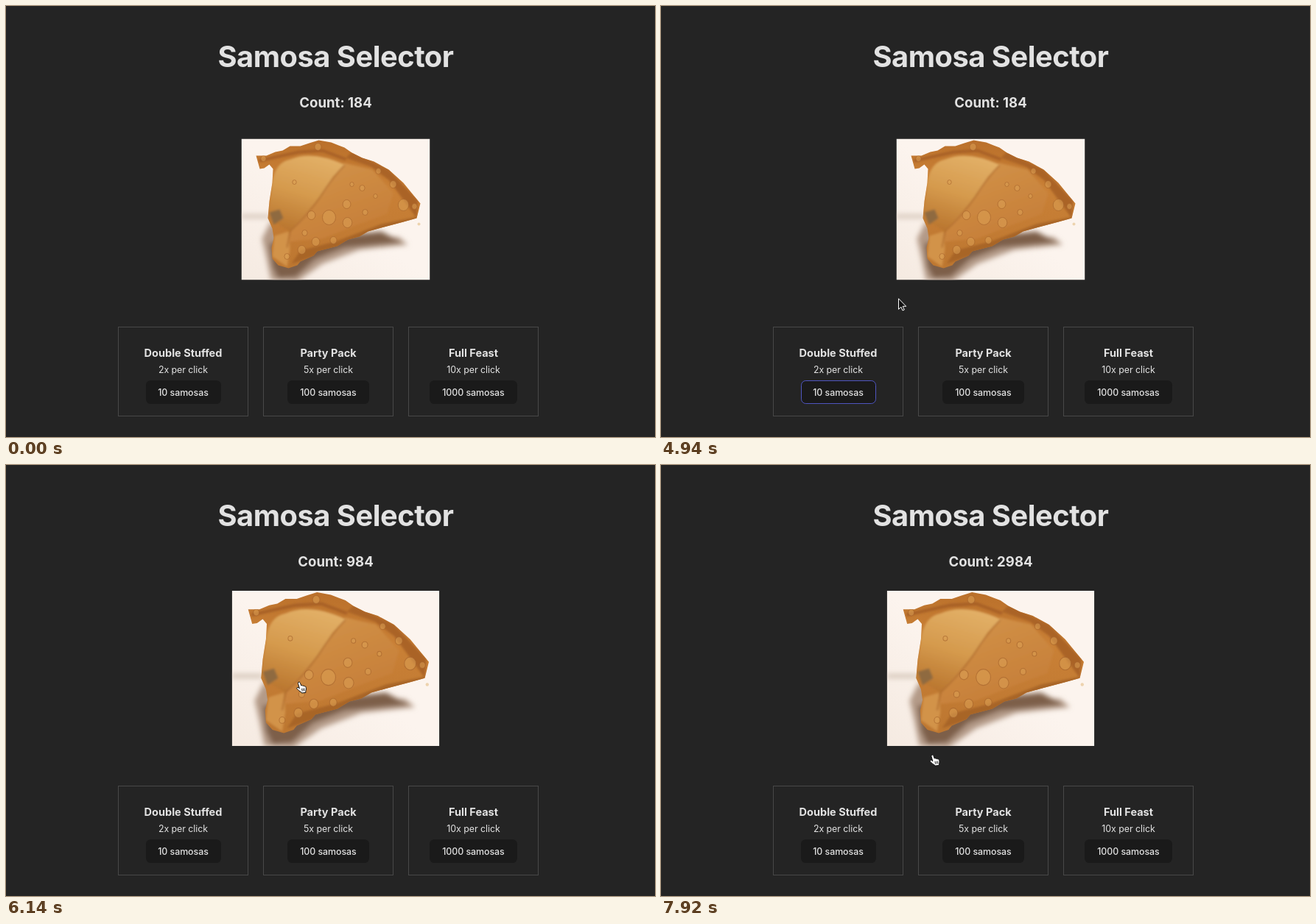
An HTML page for the animation above (8000 ms loop, 881 px wide and 586 px high).

```html
<!DOCTYPE html>
<html lang="en">
<head>
<meta charset="utf-8">
<title>Samosa Selector</title>
<style>
  html, body { margin: 0; width: 100%; height: 100%; overflow: hidden; background: #242424; }
  svg { display: block; width: 100%; height: 100%; }
  text {
    font-family: Inter, "Open Sans", sans-serif;
    font-optical-sizing: none;
    font-size: 12.4px;
    letter-spacing: -.004em;
    text-anchor: middle;
    fill: #e2e2e2;
  }
  .title { font-size: 39.8px; font-weight: 700; letter-spacing: -.012em; }
  .count { font-size: 18.6px; font-weight: 700; letter-spacing: 0; }
  .name { font-size: 14.5px; font-weight: 700; letter-spacing: 0; }
  .price { font-weight: 500; }
  .card { fill: none; stroke: #484848; }
  .button { fill: #1a1a1a; }
  .ring { fill: none; stroke: #646cff; }
</style>
</head>
<body>
<svg viewBox="0 0 881 586">
  <defs>
    <linearGradient id="plate" x1="1" y1="0" x2="0" y2="1">
      <stop offset=".5" stop-color="#fcf4ee"/>
      <stop offset="1" stop-color="#f5eae1"/>
    </linearGradient>
    <linearGradient id="crust" x1=".6" y1="0" x2=".5" y2="1">
      <stop offset="0" stop-color="#b96f2a"/>
      <stop offset=".35" stop-color="#c98036"/>
      <stop offset="1" stop-color="#bd7731"/>
    </linearGradient>
    <linearGradient id="face" x1=".6" y1="0" x2=".3" y2="1">
      <stop offset="0" stop-color="#e2af66"/>
      <stop offset=".5" stop-color="#d59a4d"/>
      <stop offset="1" stop-color="#b9752e"/>
    </linearGradient>
    <linearGradient id="side" x2=".5" y2="1">
      <stop offset="0" stop-color="#d3944a"/>
      <stop offset="1" stop-color="#c67e38"/>
    </linearGradient>
    <filter id="soft" x="-30%" y="-50%" width="160%" height="200%"><feGaussianBlur stdDeviation="3.5"/></filter>
    <filter id="blend" x="-20%" y="-20%" width="140%" height="140%"><feGaussianBlur stdDeviation="1.4"/></filter>
    <clipPath id="frame"><path d="M0 0H256V192H0Z"/></clipPath>
    <clipPath id="inside"><use href="#body"/></clipPath>
  </defs>

  <text class="title" x="447.5" y="82.5">Samosa Selector</text>
  <text class="count" id="count" x="447.5" y="138"></text>

  <g id="photo">
    <g clip-path="url(#frame)">
      <path fill="url(#plate)" d="M0 0H256V192H0Z"/>
      <g filter="url(#soft)">
        <path fill="#b39a87" d="M40 112 28 136 34 162 40 192 76 194 110 170 160 151 226 144 214 134 150 130 80 150Z"/>
        <path fill="#7d5f4a" d="M38 142 42 174 50 190 74 188 100 164 140 148 218 141 190 126 150 130Z"/>
        <path fill="#d3c4b7" d="M0 103H38V108H0Z"/>
      </g>
      <path id="body" fill="url(#crust)" d="M20 23 25 41 31 40 38 35 43 41 42 60 38 85 36 108 42 122 44 135 41 148 42 163 50 172 64 176 76 172 80 167 98 159 103 153 130 146 145 137 160 133 172 126 190 121 220 113 238 108 243 88 233 76 220 60 200 42 180 31 164 26 150 19 140 12 132 9 122 5 105 2 92 6 80 10 66 10 56 16 46 18 34 23Z"/>
      <g clip-path="url(#inside)">
        <g filter="url(#blend)">
          <path fill="url(#side)" d="M140 33 178 42 206 74 198 102 160 116 110 136 64 140 70 118Z"/>
          <path fill="#d2934a" d="M45 132 64 126 66 150 62 174 42 160Z"/>
          <path fill="url(#face)" d="M42 60Q46 32 66 28 96 15 140 35L124 52 106 80 66 126 36 108Z"/>
          <path fill="#aa6325" d="M142 26 176 38 200 56 222 86 238 108 240 84 200 42 150 18Z"/>
          <path fill="#a86526" d="M68 170 80 152 130 139 190 116 240 106 232 114 140 146Z"/>
          <path fill="#8f6a40" d="M38 100 52 96 57 108 44 117Z"/>
          <path fill="none" stroke="#b06d2f" stroke-width="1.6" d="M140 36Q124 52 107 79 90 104 66 126L62 148"/>
          <path fill="none" stroke="#a86125" stroke-width="4" d="M24 30 46 25 78 18 110 16 142 28"/>
        </g>
        <g id="bubbles" fill="#dca055" fill-opacity=".55" stroke="#a3622a" stroke-opacity=".6"></g>
      </g>
      <circle cx="241" cy="116" r="2" fill="#edd3ae"/>
    </g>
  </g>

  <g id="cards"></g>

  <path id="arrow" fill="#111" stroke="#fff" d="M.5 .8V15.4L3.9 12.2 6 17 8.3 16 6.2 11.3H10.7Z"/>
  <g id="hand" stroke="#111" stroke-linejoin="round" stroke-linecap="round">
    <path fill="#fff" d="M3 1.5C4 .6 5 1.2 5.4 2.3L6.8 6C7.6 5.4 8.6 5.6 9 6.4 9.8 5.9 10.8 6.2 11.1 7 12.2 6.6 13 7.2 13.2 8.3 13.7 10.5 13.6 12 12.8 13.4L12.9 15.4 7.4 16 6.6 14.6C4.6 13.8 2.6 12 1 10.2 .2 9 1.6 7.8 3 8.6L4.4 9.8 2.6 3.6C2.3 2.7 2.4 2 3 1.5Z"/>
    <path fill="none" stroke-width=".8" d="M7.4 10.3 8.1 13.3M9.2 10 9.8 13M11 9.8 11.4 12.6"/>
  </g>
</svg>

<script>
const LOOP = 8000;
const $ = id => document.getElementById(id);

// Every track holds [start time, ...values]; each value stays until the next entry.
const cursorTrack = [
  [0, null],
  [1500, 'arrow', 323, 566], [1650, 'arrow', 292, 543], [1800, 'arrow', 264, 527],
  [1950, 'arrow', 267, 541], [2100, 'arrow', 269, 550],
  [2700, 'arrow', 265, 544], [2850, 'arrow', 258, 534], [3000, 'arrow', 253, 526], [3150, 'arrow', 251, 523],
  [3450, 'hand', 247, 526], [3600, 'hand', 245, 528], [3750, 'hand', 242, 526], [3890, 'hand', 241, 525],
  [4190, 'hand', 240, 525], [4490, 'hand', 239, 525],
  [4940, 'arrow', 322, 397],
  [5090, 'hand', 362, 345], [5240, 'hand', 385, 308], [5390, 'hand', 394, 294],
  [6440, 'hand', 394, 300], [6590, 'hand', 394, 304],
  [7770, 'hand', 388, 330], [7920, 'hand', 364.5, 393],
];
const countTrack = [
  [0, 184], [5690, 584], [6140, 984], [6890, 1384], [7040, 1784], [7180, 2184], [7480, 2584], [7770, 2984],
];
const HOVER = 1.1, PRESS = .95;
const scaleTrack = [
  [0, 1], [5090, HOVER], [5540, PRESS], [5690, HOVER], [5990, PRESS], [6140, HOVER],
  [6740, PRESS], [6890, HOVER], [7040, PRESS], [7180, HOVER], [7330, PRESS], [7480, HOVER],
];
const ringTrack = [[0, 0], [3450, .5], [3600, 1], [4940, .72], [5090, .2], [5240, 0]];

const at = (track, t) => track.findLast(([start]) => start <= t).slice(1);

const cards = [
  ['Double Stuffed', 2, 10, 190, 102],
  ['Party Pack', 5, 100, 382, 111],
  ['Full Feast', 10, 1000, 575, 119],
];
$('cards').innerHTML = cards.map(([name, gain, price, left, width], i) => {
  const x = 152.5 + 197 * i, mid = x + 88;
  return `<rect class="card" x="${x}" y="436.5" width="176" height="121"/>
    <text class="name" x="${mid}" y="477">${name}</text>
    <text x="${mid}" y="498.5">${gain}x per click</text>
    <rect class="button" x="${left}" y="509" width="${width}" height="32" rx="6.4"/>
    <text class="price" x="${mid}" y="530">${price} samosas</text>`;
}).join('') + '<rect class="ring" id="ring" x="190.5" y="509.5" width="101" height="31" rx="6"/>';

const bubbles = [
  [119, 107, 10], [95, 104, 6], [143, 89, 6], [144, 114, 7], [220, 90, 8], [104, 11, 5], [206, 62, 5],
  [164, 67, 4], [101, 140, 6], [82, 151, 6], [72, 59, 3], [168, 100, 4], [186, 44, 4], [30, 27, 4],
  [86, 128, 4], [235, 92, 4], [125, 138, 5], [150, 62, 3], [62, 160, 4], [182, 78, 3],
];
$('bubbles').innerHTML = bubbles.map(([x, y, r]) =>
  `<ellipse cx="${x}" cy="${y}" rx="${r * .9}" ry="${r}"/>`).join('');

function draw(now) {
  const t = now % LOOP;
  const [kind, x, y] = at(cursorTrack, t);
  for (const id of ['arrow', 'hand']) {
    $(id).style.display = id === kind ? '' : 'none';
    if (id === kind) $(id).setAttribute('transform', `translate(${x} ${y})`);
  }
  $('count').textContent = `Count: ${at(countTrack, t)[0]}`;
  $('photo').setAttribute('transform',
    `translate(447.5 276.5) scale(${at(scaleTrack, t)[0]}) translate(-128 -96)`);
  $('ring').setAttribute('opacity', at(ringTrack, t)[0]);
}

function tick() {
  draw(performance.now());
  requestAnimationFrame(tick);
}
tick();
</script>
</body>
</html>
```
